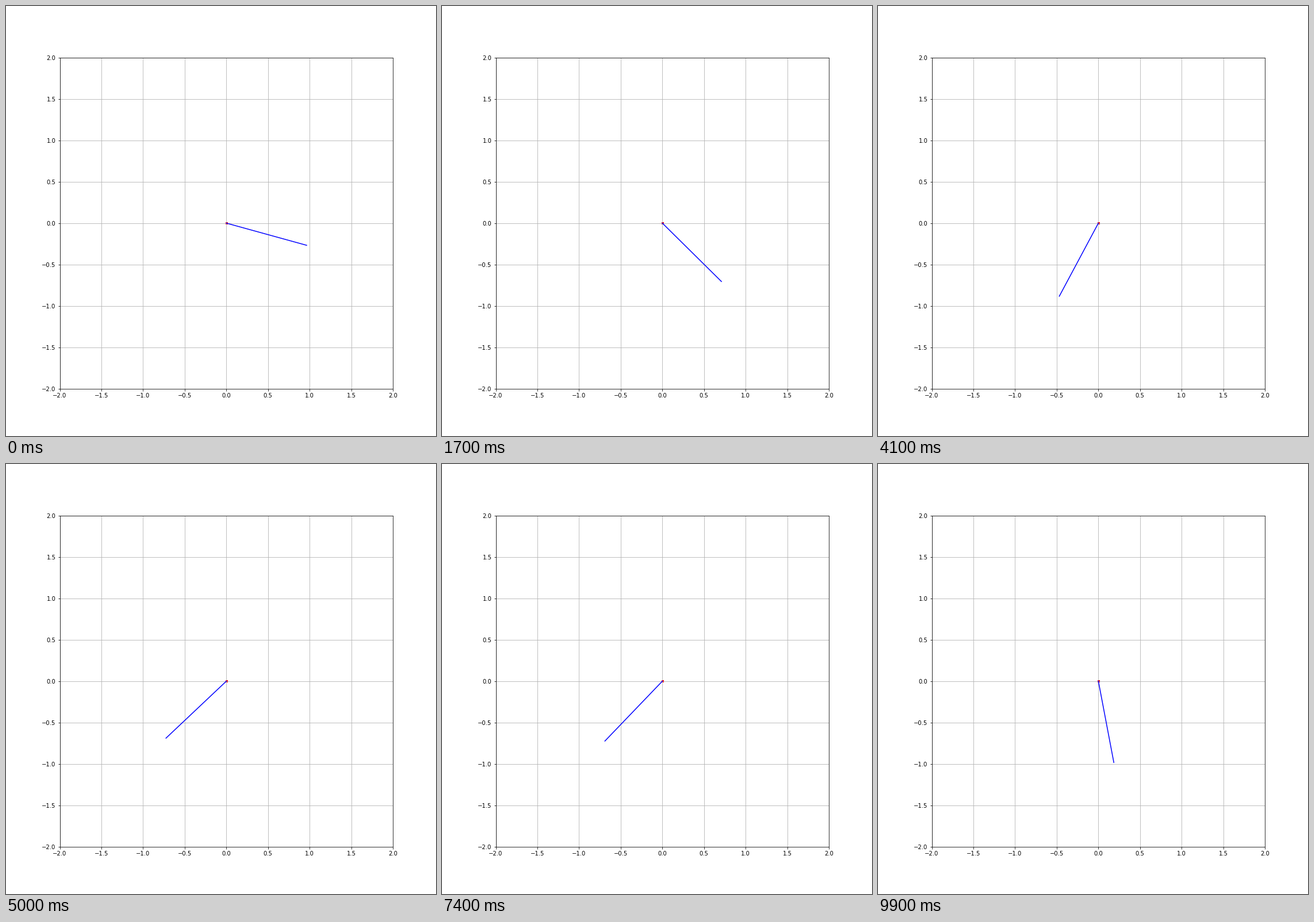
A matplotlib script that plays this animation: 748x748 px, repeating every 10000 ms.

```python
import numpy as np
import matplotlib.pyplot as plt
from matplotlib.animation import FuncAnimation
from matplotlib.patches import Rectangle

SIZE, DPI = 748, 72
FRAMES, INTERVAL = 100, 100
START = 1.3  # radians
DAMPING, OMEGA = 0.05, 0.5

fig, ax = plt.subplots(figsize=(SIZE / DPI, SIZE / DPI), dpi=DPI)
ax.set(xlim=(-2, 2), ylim=(-2, 2))
ticks = np.arange(-2, 2.5, 0.5)
ax.set_xticks(ticks)
ax.set_yticks(ticks)
ax.grid(True)

# pivot, kept under the grid lines
ax.add_patch(Rectangle((-0.01, -0.01), 0.02, 0.02, color="red", lw=1))
rod, = ax.plot([], [], color="blue", lw=1.5)


def swing(t):
    """Angle from the vertical of a damped pendulum."""
    return START * np.exp(-DAMPING * t) * np.cos(OMEGA * t)


def update(i):
    angle = swing(i * INTERVAL / 1000)
    rod.set_data([0, np.sin(angle)], [0, -np.cos(angle)])
    return rod,


anim = FuncAnimation(fig, update, frames=FRAMES, interval=INTERVAL, repeat=True)
plt.show()
```
